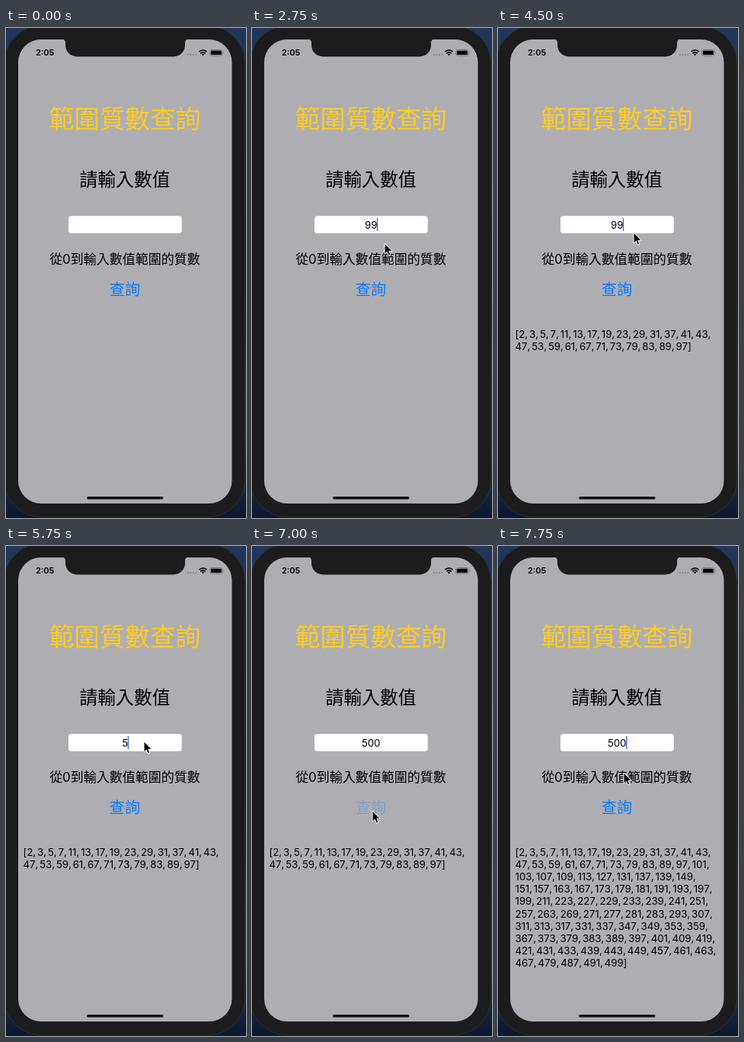
An HTML page that plays this animation: 315x642 px, repeating every 8000 ms.

```html
<!DOCTYPE html>
<html lang="zh-Hant">
<head>
<meta charset="utf-8">
<title>範圍質數查詢</title>
<style>
  html, body { margin: 0; width: 100%; height: 100%; overflow: hidden; background: #0b1a36; }
  svg { display: block; width: 315px; height: 642px; }
  text { font-family: Inter, "Noto Sans CJK TC", "Noto Sans CJK", sans-serif; }
  .center { text-anchor: middle; }
  .digits { font-size: 13.3px; font-kerning: none; letter-spacing: -.1px; word-spacing: -1.6px; }
</style>
</head>
<body>
<svg viewBox="0 0 315 642">
  <defs>
    <linearGradient id="wallpaper" x2="0" y2="1">
      <stop offset="0" stop-color="#20375a"/>
      <stop offset=".5" stop-color="#0f1d36"/>
      <stop offset=".8" stop-color="#33475f"/>
      <stop offset="1" stop-color="#0b1730"/>
    </linearGradient>
  </defs>
  <rect width="315" height="642" fill="url(#wallpaper)"/>
  <rect x="-3" y="-3" width="317" height="644" rx="50" fill="#1c1c1c" stroke="#343434" stroke-width=".8"/>
  <rect x="16" y="15" width="280.500" height="608" rx="30" fill="#aeaeb2"/>
  <path fill="#1c1c1c" d="M73.500 14.500A4.500 4.500 0 0 1 78 19V22.500A15 15 0 0 0 93 37.500H220A15 15 0 0 0 235 22.500V19A4.500 4.500 0 0 1 239.500 14.500Z"/>
  <rect x="106" y="614" width="100.500" height="3.500" rx="1.750" fill="#111"/>

  <text x="39" y="36.300" font-size="11" font-weight="600">2:05</text>
  <g fill="#808084">
    <circle cx="238.800" cy="35" r="1.100"/><circle cx="242.300" cy="35" r="1.100"/>
    <circle cx="245.800" cy="35" r="1.100"/><circle cx="249.300" cy="35" r="1.100"/>
  </g>
  <g fill="none" stroke="#000" stroke-width="1.600">
    <path d="M253.300 31.200Q258.500 26.800 263.700 31.200M255.200 33.300Q258.500 30.500 261.800 33.300"/>
    <path d="M256.700 34.300Q258.500 33 260.300 34.300L258.500 36.400Z" fill="#000" stroke="none"/>
    <rect x="267.700" y="28.500" width="16.300" height="7.800" rx="2.200" stroke="#66666a" stroke-width=".8"/>
  </g>
  <rect x="268.900" y="29.700" width="13.900" height="5.400" rx="1.200"/>
  <path d="M285 31Q286.300 32.400 285 33.800Z" fill="#66666a"/>

  <text class="center" x="156" y="131" font-size="33.200" fill="#ffcb22">範圍質數查詢</text>
  <text class="center" x="156" y="206.500" font-size="23.800">請輸入數值</text>
  <rect x="82" y="246.300" width="148.700" height="22.700" rx="3.800" fill="#fff"/>
  <text class="center" x="156" y="308.500" font-size="17">從0到輸入數值範圍的質數</text>
  <text class="center" id="button" x="156" y="349.800" font-size="20.200" fill="#0a7aff">查詢</text>

  <text class="center digits" id="entry" x="156.200" y="262.600"></text>
  <rect id="caret" y="249" width="1.400" height="17" fill="#4263ee"/>
  <g id="result" class="digits"></g>
  <path id="pointer" d="M0 0V14.300L3.300 11.200 5.400 16.200 7.900 15.100 5.800 10.300H10.300Z"
        stroke="#fff" stroke-width="1" stroke-linejoin="round"/>
</svg>
<script>
const LOOP = 8000;
const HIDDEN = -100;
const $ = id => document.getElementById(id);

// time, pointer x, pointer y, entry, caret shown, button opacity, upper limit of the listed primes
const steps = [
  [0, HIDDEN, 0, '', 0, 1, 0],
  [500, 285, 400, '', 0, 1, 0],
  [750, 225, 300, '', 0, 1, 0],
  [1000, 191, 262, '', 0, 1, 0],
  [1500, 174, 262, '', 1, 1, 0],
  [1750, 174, 262, '', 0, 1, 0],
  [2000, 174, 262, '', 1, 1, 0],
  [2500, 174, 262, '9', 1, 1, 0],
  [2750, 174, 282, '99', 1, 1, 0],
  [3000, 160, 332, '99', 1, 1, 0],
  [3250, 155, 343, '99', 0, 1, 0],
  [3500, 155, 343, '99', 1, .25, 0],
  [3750, 155, 343, '99', 1, .8, 99],
  [4000, 155, 343, '99', 1, 1, 99],
  [4250, 165, 310, '99', 0, 1, 99],
  [4500, 178, 268, '99', 1, 1, 99],
  [4750, 181, 256, '99', 1, 1, 99],
  [5000, 181, 256, '9', 1, 1, 99],
  [5250, 181, 256, '', 1, 1, 99],
  [5750, 181, 256, '5', 1, 1, 99],
  [6000, 181, 256, '50', 1, 1, 99],
  [6250, 181, 256, '500', 1, 1, 99],
  [6500, 168, 315, '500', 1, 1, 99],
  [6750, 158, 347, '500', 1, 1, 99],
  [7000, 158, 347, '500', 0, .25, 99],
  [7250, 158, 347, '500', 1, .8, 500],
  [7500, 161, 325, '500', 1, 1, 500],
  [7750, 165, 297, '500', 1, 1, 500]
];

function primesUpTo(limit) {
  const primes = [];
  for (let n = 2; n <= limit; n++)
    if (primes.every(p => n % p)) primes.push(n);
  return primes;
}

function resultMarkup(limit) {
  if (!limit) return '';
  const words = `[${primesUpTo(limit).join(', ')}]`.split(' ');
  return [14, 12, 9, 10, 9, 9, 9, 9, 9, 9].map((count, row) =>
    `<text x="22.600" y="${405.8 + row * 16.15}">${words.splice(0, count).join(' ')}</text>`).join('');
}

const results = Object.fromEntries([0, 99, 500].map(limit => [limit, resultMarkup(limit)]));
let shown;

function draw(now) {
  const time = now % LOOP;
  const step = steps.findLast(s => s[0] <= time);
  if (step !== shown) {
    const [, x, y, entry, caret, opacity, limit] = shown = step;
    $('pointer').setAttribute('transform', `translate(${x} ${y})`);
    $('entry').textContent = entry;
    $('caret').setAttribute('x', 155.5 + entry.length * 4.15);
    $('caret').setAttribute('opacity', caret);
    $('button').setAttribute('opacity', opacity);
    $('result').innerHTML = results[limit];
  }
  requestAnimationFrame(draw);
}
draw(performance.now());
</script>
</body>
</html>
```
